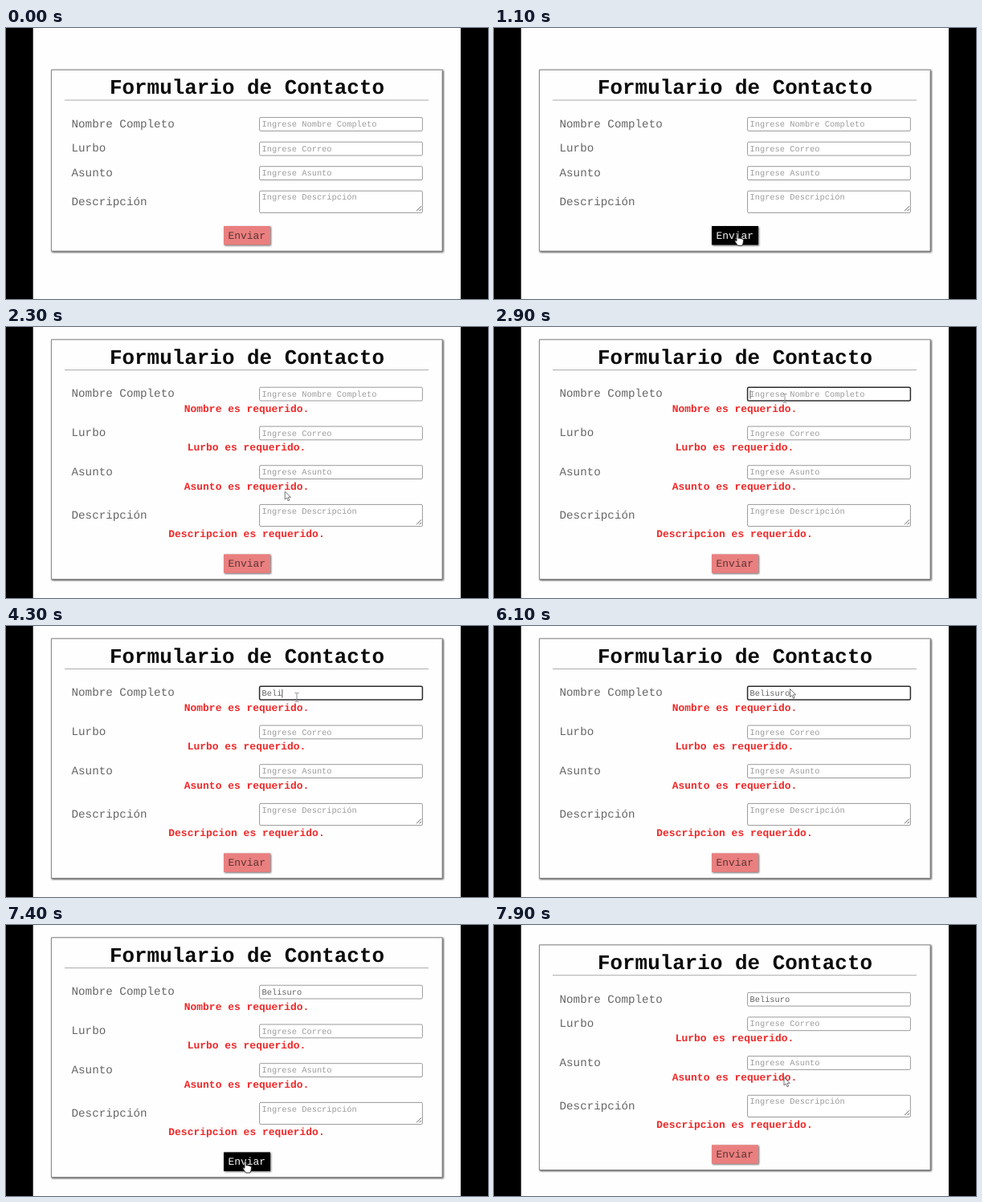
An HTML page that plays this animation: 600 px wide and 338 px high, repeating every 8000 ms.

```html
<!DOCTYPE html>
<html lang="es">
<head>
<meta charset="utf-8">
<title>Formulario de Contacto</title>
<style>
  html, body { margin: 0; width: 100%; height: 100%; overflow: hidden; background: #000; }
  svg { display: block; width: 600px; height: 338px; }
  text { font-family: "Liberation Mono", monospace; text-rendering: geometricPrecision; white-space: pre; }
  .title { font-size: 25.92px; font-weight: bold; text-anchor: middle; fill: #0c0c0c; }
  .label { font-size: 14.25px; fill: #666; }
  .field { fill: #fff; stroke: #999; }
  .field.focus { stroke: #2c2c2c; stroke-width: 1.5; }
  .hint { font-size: 10.37px; fill: #9c9c9c; }
  .hint.value { fill: #646464; }
  .error { font-size: 12.96px; font-weight: bold; text-anchor: middle; fill: #f02828; }
  .card { fill: #fefefe; stroke: #8a8a8a; filter: drop-shadow(1.7px 1.7px 1px rgba(0,0,0,.75)); }
  .button { font-size: 12.96px; text-anchor: middle; }
  .button rect { fill: #ea7f7f; filter: drop-shadow(1.7px 1.7px 1.2px rgba(0,0,0,.6)); }
  .button text { fill: #5c3434; }
  .button.hover rect { fill: #000; }
  .button.hover text { fill: #f4f4f4; }
  #hand { fill: #fff; stroke: #222; stroke-width: .9; stroke-linejoin: round; }
  #arrow { fill: #fff; stroke: #666; stroke-width: .9; stroke-linejoin: round; }
  #beam { fill: none; stroke: #888; stroke-width: .9; }
</style>
</head>
<body>
<svg viewBox="0 0 600 338">
  <rect width="600" height="338"/>
  <rect x="33.7" width="532.3" height="338" fill="#fefefe"/>
  <rect class="card" id="card" x="56.5" width="486.6"/>
  <g id="head">
    <text class="title" x="300" y="82.2">Formulario de Contacto</text>
    <path d="M73 90H526" stroke="#aaa"/>
  </g>
  <g id="rows"></g>
  <g class="button" id="button">
    <rect x="271" y="247" width="58" height="23.5"/>
    <text x="299.7" y="263">Enviar</text>
  </g>
  <path id="caret" d="M0 79V89.5" stroke="#555"/>
  <path id="arrow" d="M0 0V10L2.3 7.9L4 11.8L5.7 11L4 7.3H7.2Z"/>
  <path id="beam" d="M-2.5 -5.5H-.7L0 -5L.7 -5.5H2.5M0 -5V5M-2.5 5.5H-.7L0 5L.7 5.5H2.5"/>
  <path id="hand" d="M0 0Q1.2 -1 2 .2V5L3.8 4.8L5.6 5.3L7.4 5.9Q8.7 6.2 8.6 7.6L8 11.3L7 14H1.4L-2 8.9Q-2.6 7.5 -1.2 7.4L0 8.4Z"/>
</svg>
<script>
const LOOP = 8000, STEP = 100, ERROR_H = 18.2;
const NAME = 'Belisuro', CHAR_W = 6.222;
const KEYS = [3500, 4000, 4100, 4300, 4800, 4900, 5100, 5200];
const SUBMITS = [1300, 7600];
const FOCUS = [2800, 6700];
const CARET_OFF = [[3200, 3500], [5700, 6200]];
const HOVERS = [[1000, 1300], [6900, 7700]];

// label, placeholder, error subject, field top, field height, label baseline, error baseline
const FIELDS = [
  ['Nombre Completo', 'Nombre Completo', 'Nombre', 111.6, 16.8, 123.9, 142.2],
  ['Lurbo', 'Correo', 'Lurbo', 142.2, 16.8, 154.2, 172.5],
  ['Asunto', 'Asunto', 'Asunto', 172.7, 16.8, 185, 203.3],
  ['Descripción', 'Descripción', 'Descripcion', 203.2, 27.2, 220.7, 244.2]
];

// time, x, y, pointer shape
const POINTER = [
  [100, 420, 98, 'arrow'],
  [400, 366, 162, 'arrow'],
  [900, 300, 246, 'arrow'],
  [1000, 300, 257, 'hand'],
  [1300, 306, 258, 'beam'],
  [1500, 309, 259, 'beam'],
  [1600, 316, 268, 'arrow'],
  [1800, 336, 288, 'arrow'],
  [2000, 336, 288, 'arrow'],
  [2100, 338, 275, 'arrow'],
  [2600, 361, 100, 'beam'],
  [2800, 362, 89, 'beam'],
  [5800, 362, 89, 'beam'],
  [5900, 372, 70, 'arrow'],
  [6000, 372, 70, 'arrow'],
  [6100, 368.5, 78.5, 'arrow'],
  [6700, 316, 262, 'arrow'],
  [6900, 299, 298, 'hand'],
  [7400, 297, 295, 'hand'],
  [7600, 298, 292, 'hand'],
  [7700, 333, 280, 'arrow'],
  [7800, 357, 249, 'arrow'],
  [7900, 361, 190, 'arrow']
];

const $ = id => document.getElementById(id);
const show = (el, on) => { el.style.display = on ? '' : 'none'; };
const move = (el, x, y) => el.setAttribute('transform', `translate(${x} ${y})`);
const within = (t, [a, b]) => t >= a && t < b;

$('rows').innerHTML = FIELDS.map(([label, hint, subject, y, h, base, errBase], i) => {
  const area = i === 3;
  const grip = area ? `<path d="M511 ${y + 25}L517 ${y + 19}M514.5 ${y + 25}L517 ${y + 22.5}" stroke="#666" fill="none"/>` : '';
  return `<g>
    <text class="label" x="81.5" y="${base}">${label}</text>
    <rect class="field" x="315.6" y="${y}" width="202.8" height="${h}" rx="1.5"/>${grip}
    <text class="hint" x="318.5" y="${y + (area ? 11.2 : 11.6)}">Ingrese ${hint}</text>
    <text class="error" x="299.5" y="${errBase}">${subject} es requerido.</text>
  </g>`;
}).join('');

const rows = [...$('rows').children];
const nameField = rows[0].querySelector('.field');
const nameText = rows[0].querySelector('.hint');
const nameHint = nameText.textContent;
const pointers = ['arrow', 'beam', 'hand'];

// The card stays centred; each visible error pushes down what follows it.
function layout(t) {
  const errors = FIELDS.map((_, i) => t >= SUBMITS[0] && (i > 0 || t < SUBMITS[1]));
  const extra = errors.filter(Boolean).length * ERROR_H;
  let shift = -extra / 2;
  $('card').setAttribute('y', 52.2 + shift);
  $('card').setAttribute('height', 226 + extra);
  move($('head'), 0, shift);
  rows.forEach((row, i) => {
    move(row, 0, shift);
    show(row.querySelector('.error'), errors[i]);
    if (errors[i]) shift += ERROR_H;
  });
  move($('button'), 0, shift);
  $('button').classList.toggle('hover', HOVERS.some(h => within(t, h)));
}

function typing(t) {
  const n = KEYS.filter(k => t >= k).length;
  const focused = within(t, FOCUS);
  nameText.textContent = n ? NAME.slice(0, n) : nameHint;
  nameText.classList.toggle('value', n > 0);
  nameField.classList.toggle('focus', focused);
  show($('caret'), focused && !CARET_OFF.some(r => within(t, r)));
  move($('caret'), 319 + n * CHAR_W, 0);
}

function pointer(t) {
  const i = POINTER.findLastIndex(k => t >= k[0]);
  const a = POINTER[i];
  pointers.forEach(id => show($(id), a && a[3] === id));
  if (!a) return;
  const b = POINTER[i + 1] || a;
  const f = b === a ? 0 : (t - a[0]) / (b[0] - a[0]);
  move($(a[3]), a[1] + (b[1] - a[1]) * f, a[2] + (b[2] - a[2]) * f);
}

const start = performance.now();
function frame() {
  const t = Math.floor((performance.now() - start) % LOOP / STEP) * STEP;
  layout(t);
  typing(t);
  pointer(t);
  requestAnimationFrame(frame);
}
frame();
</script>
</body>
</html>
```
